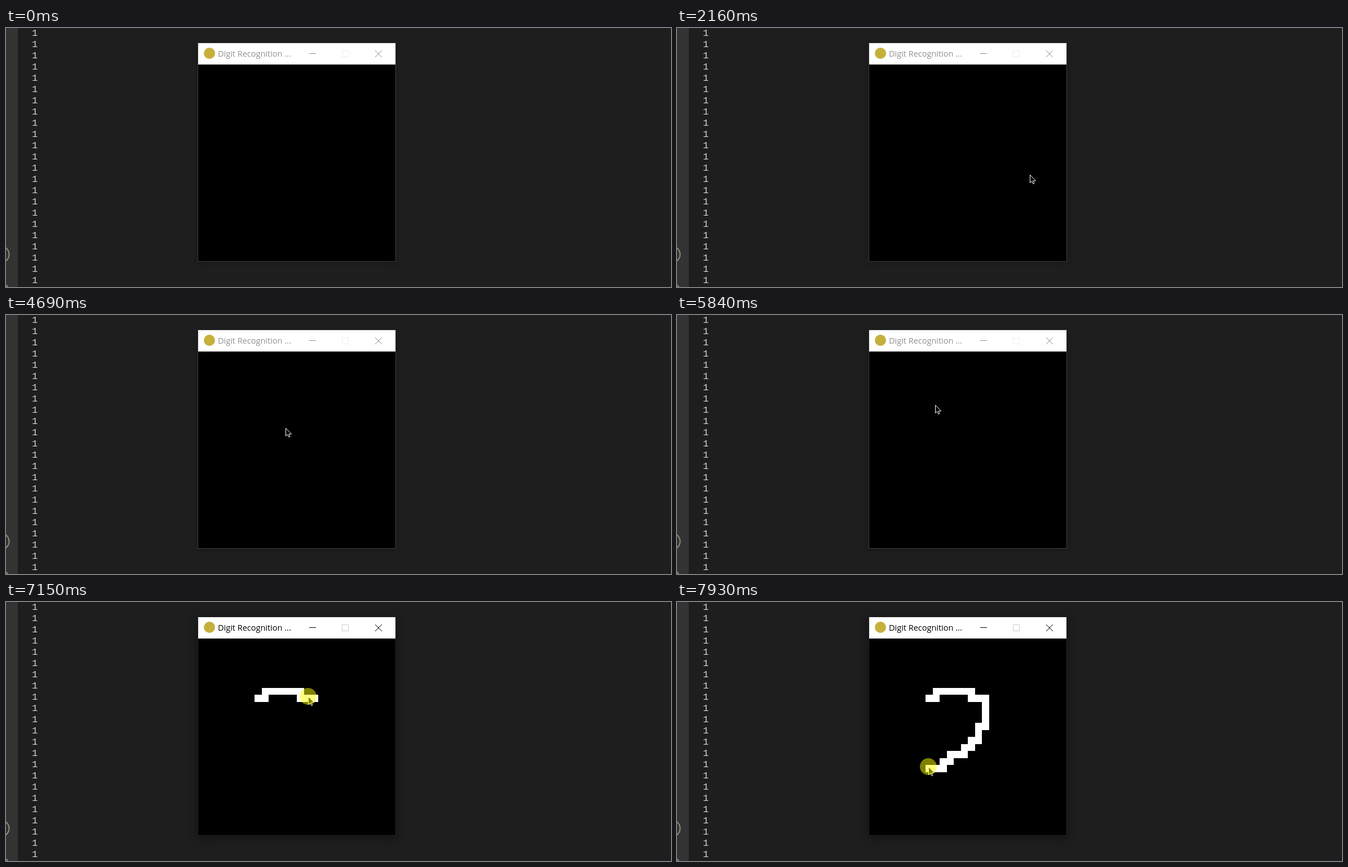
An HTML page with a canvas that plays this animation: 1180x461 px, repeating every 8000 ms.

```html
<!DOCTYPE html>
<html lang="en">
<head>
<meta charset="utf-8">
<title>Digit Recognition</title>
<style>
  html, body { margin: 0; width: 100%; height: 100%; overflow: hidden; background: #1e1e1e; }
  canvas { display: block; }
</style>
</head>
<body>
<canvas id="stage" width="1180" height="461"></canvas>
<script>
const LOOP = 8000, FPS = 13, CELL = 12.5, LEFT = 341, TOP = 65;
const c = document.getElementById('stage').getContext('2d');

const FOCUS = 80, PRESS = 81, STROKE = 84, END = 103;
const ENTRY = [900, 470];
const glides = [
  { from: 1, to: 12, at: [485, 247] },
  { from: 12, to: 15, at: [485, 242] },
  { from: 17, to: 22, at: [660, 287] },
  { from: 23, to: 25, at: [662, 281] },
  { from: 26, to: 28, at: [626, 261] },
  { from: 29, to: 38, at: [1100, 470] },
  { from: 51, to: 62, at: [488, 197] },
  { from: 62, to: 66, at: [468, 173] },
  { from: 67, to: 73, at: [460, 156] },
  { from: 74, to: 76, at: [458, 160] }
];

// Grid cells of the stroke, walked from column 9, row 7.
const moves = { U: [0, -1], D: [0, 1], L: [-1, 0], R: [1, 0] };
const cells = [[9, 7]];
for (const key of 'DLRURRRRRDRRDDDDLDDLDLDLLDLDLL') {
  const [col, row] = cells[cells.length - 1], [dx, dy] = moves[key];
  cells.push([col + dx, row + dy]);
}

const clamp = u => Math.min(1, Math.max(0, u));
const easeOut = u => 1 - (1 - u) ** 1.8;
const mix = (a, b, u) => a.map((v, i) => v + (b[i] - v) * u);

function strokeProgress(tick) {
  return (cells.length - 1) * clamp((tick - STROKE) / (END - STROKE)) ** 1.32;
}

function mouseAt(tick) {
  if (tick > STROKE) {
    const p = strokeProgress(tick), i = Math.floor(p);
    const [col, row] = mix(cells[i], cells[i + 1] || cells[i], p - i);
    return [LEFT + (col + .5) * CELL - 1, TOP + (row + .5) * CELL - 3];
  }
  return glides.reduce((pos, { from, to, at }) =>
    mix(pos, at, easeOut(clamp((tick - from) / (to - from)))), ENTRY);
}

function box(color, x, y, w, h) {
  c.fillStyle = color;
  c.fillRect(x, y, w, h);
}

function disc(color, x, y, r) {
  c.fillStyle = color;
  c.beginPath();
  c.arc(x, y, r, 0, 2 * Math.PI);
  c.fill();
}

function line(x1, y1, x2, y2) {
  c.beginPath();
  c.moveTo(x1, y1);
  c.lineTo(x2, y2);
  c.stroke();
}

function drawTerminal() {
  box('#1e1e1e', 0, 0, 1180, 461);
  box('#333333', 0, 0, 21, 461);
  c.strokeStyle = '#948a7c';
  c.lineWidth = 2;
  for (const y of [403, 469]) {
    c.beginPath();
    c.arc(-9, y, 14.5, 0, 2 * Math.PI);
    c.stroke();
  }
  c.fillStyle = '#d4d4d4';
  c.font = '17px "Liberation Mono", monospace';
  for (let y = 14; y < 461; y += 20) c.fillText('1', 46, y);
}

function drawWindow(active) {
  c.save();
  c.shadowColor = active ? 'rgba(0,0,0,.45)' : 'rgba(0,0,0,.3)';
  c.shadowBlur = active ? 16 : 8;
  c.shadowOffsetY = active ? 4 : 2;
  box(active ? '#242424' : '#404040', 340, 26, 352, 390);
  c.restore();
  box('#ffffff', LEFT, 27, 350, 38);
  box('#000000', LEFT, TOP, 350, 350);

  disc('#c5b03c', 361, 45, 10);
  c.fillStyle = c.strokeStyle = active ? '#000000' : '#909090';
  c.font = '14.5px "Open Sans", "Noto Sans", sans-serif';
  c.fillText('Digit Recognition ...', 376, 51);
  c.lineWidth = 1;
  line(538, 45.5, 550, 45.5);
  line(655, 40, 667, 52);
  line(667, 40, 655, 52);
  c.strokeStyle = active ? '#cccccc' : '#eeeeea';
  c.strokeRect(596.5, 40.5, 11, 11);
}

function drawDigit(tick) {
  if (tick < PRESS) return;
  // Edges snap to whole pixels so that neighbours join without seams.
  const edge = (origin, n) => Math.round(origin + n * CELL);
  for (const [col, row] of cells.slice(0, Math.ceil(strokeProgress(tick)) + 1)) {
    const x = edge(LEFT, col), y = edge(TOP, row);
    box('#ffffff', x, y, edge(LEFT, col + 1) - x, edge(TOP, row + 1) - y);
  }
}

function drawMouse(tick) {
  const [x, y] = mouseAt(tick).map(Math.round);
  const arrow = new Path2D('M0 0V14L3 11L5.5 16L7.5 15L5.2 10.5H10Z');
  c.save();
  c.translate(x + .5, y + .5);
  c.fillStyle = '#000000';
  c.strokeStyle = '#ffffff';
  c.lineWidth = 1;
  c.fill(arrow);
  c.stroke(arrow);
  c.restore();
  if (tick >= FOCUS) disc('rgba(255,255,0,.5)', x, y, 15);
}

function frame() {
  const tick = Math.floor(performance.now() % LOOP * FPS / 1000 + .2);
  drawTerminal();
  drawWindow(tick >= FOCUS);
  drawDigit(tick);
  drawMouse(tick);
  requestAnimationFrame(frame);
}
frame();
</script>
</body>
</html>
```
